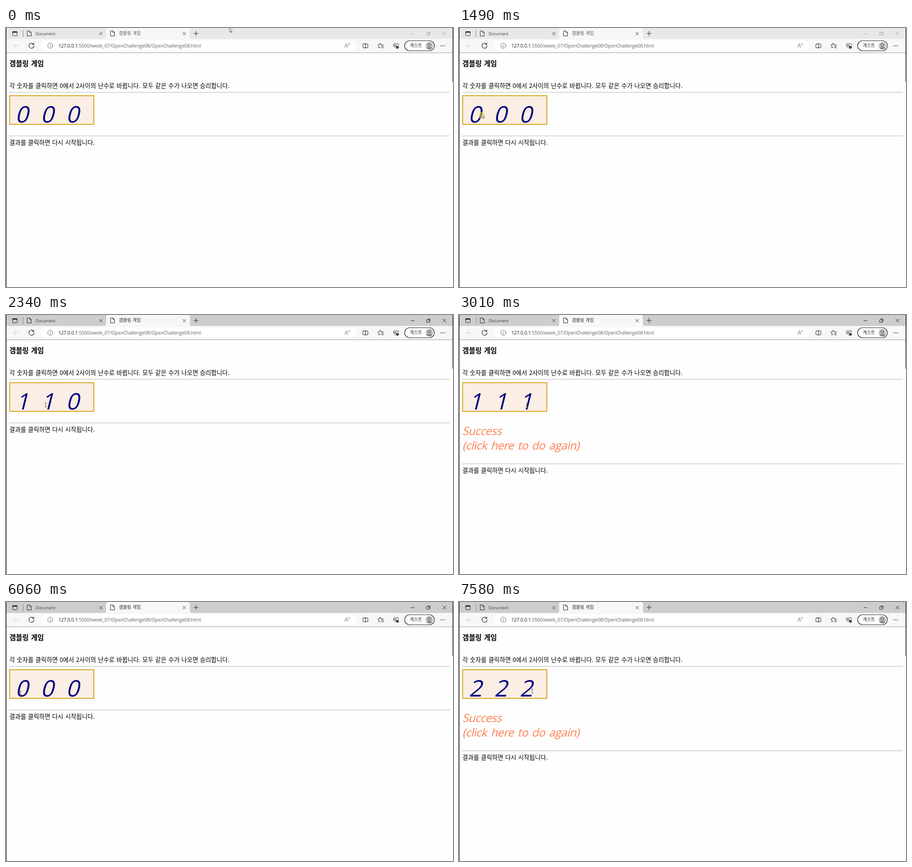
Recreate the animation shown at these times as an HTML page. Size 982 by 570 pixels, loop 8000 ms.

```html
<!DOCTYPE html>
<html lang="ko">
<head>
<meta charset="utf-8">
<title>갬블링 게임</title>
<style>
  html, body { margin: 0; width: 100%; height: 100%; overflow: hidden; background: #fefefe; }
  svg { display: block; width: 982px; height: 570px; }
  text { white-space: pre; }
  .ui { font-family: "Open Sans", "Noto Sans", sans-serif; }
  .ko { font-family: "Noto Sans CJK KR", "Noto Sans CJK", "Noto Sans CJK JP", sans-serif; }
  .body { font-size: 13.3px; word-spacing: .4px; }
  .icon { fill: none; stroke: #222; stroke-width: 1; stroke-linecap: round; stroke-linejoin: round; }
  .digit { font-size: 50px; fill: navy; text-anchor: middle; }
  .result { font-size: 24.6px; letter-spacing: -.45px; word-spacing: 2.6px; fill: coral; }
  .rule { fill: #b4b4b4; }
  #beam { fill: none; stroke: #a8a8a8; stroke-width: .9; mix-blend-mode: difference; }
</style>
</head>
<body>
<svg viewBox="0 0 982 570">
  <defs>
    <path id="doc" d="M1 .5H6L9.5 4V11.5H1ZM6 .5V4H9.5"/>
    <path id="cross" d="M-3-3L3 3M3-3L-3 3"/>
  </defs>
  <rect width="982" height="570" fill="#fefefe"/>

  <!-- tab strip -->
  <rect id="strip" width="982" height="25"/>
  <path d="M216 24Q220 24 220 20V4Q220 0 224 0H400Q404 0 404 4V20Q404 24 408 24Z" fill="#f7f7f7"/>
  <rect x="37" y="5" width="1" height="15" fill="#888"/>
  <g class="icon">
    <rect x="14.5" y="8" width="10" height="9" rx="1.5"/>
    <path d="M15 9H24" stroke-width="2.4"/>
    <use href="#doc" x="46" y="6"/>
    <use href="#doc" x="229" y="6"/>
    <use href="#cross" x="208.5" y="12.5"/>
    <use href="#cross" x="391.5" y="12.5"/>
    <path d="M412.5 12H422.5M417.5 7V17"/>
  </g>
  <g id="controls" class="icon">
    <path d="M889.5 12.5H896.5M959.5 8.5L967 16M967 8.5L959.5 16"/>
    <path d="M924.5 10.5H930V16H924.5ZM926.2 8.7H931.7V14.3"/>
  </g>
  <text class="ui" x="65" y="15.5" font-size="9.3" letter-spacing="-.27" fill="#444">Document</text>
  <text id="tabTitle" class="ko" x="248" y="15.4" font-size="9.8" word-spacing=".3">갬블링 게임</text>

  <!-- toolbar -->
  <rect y="24" width="982" height="30" fill="#f7f7f7"/>
  <rect y="54" width="982" height="1" fill="#a0a0a0"/>
  <rect x="77" y="27" width="692" height="24" rx="12" fill="#fff"/>
  <g class="icon">
    <path d="M28 39H16.5M21.5 34L16.5 39L21.5 44" stroke="#c8c8c8"/>
    <path d="M60.5 35.6A5.6 5.6 0 1 0 61.6 39M61 33.2V36.2H58" stroke-width="1.2"/>
    <circle cx="97.3" cy="39" r="5.6" stroke="#555" stroke-width=".9"/>
    <path d="M97.3 38.5V42M97.3 36.4V36.5" stroke="#555"/>
    <path d="M744 43L747.5 34L751 43M745.2 40H749.8M752 34Q753.2 35.5 752 37M754 33Q756 35.5 754 38" stroke="#777" stroke-width=".9"/>
    <rect x="784" y="35" width="11" height="8.5" rx="1.2"/>
    <path d="M789.5 34V44.5"/>
    <path d="M826 37.2L823.6 37L821.8 33.3L820.2 37L816.8 37.4L819.4 40.2L818.8 44L821.6 42.3M825 37.2H829.5M824.5 40.4H829.5M824.5 43.4H829.5"/>
    <path d="M856 44.3L852 40.2Q850.3 37.5 852 35.2Q854.5 33 857 35.8Q859.5 33 862 35.2Q863 36.5 862.7 38M851.5 39H854L855.3 37L857 41L858.2 39"/>
    <circle cx="860" cy="42.5" r="2.6" fill="#222"/>
    <path d="M858.8 42.5L859.7 43.4L861.3 41.6" stroke="#fff" stroke-width=".7"/>
    <rect x="875.7" y="28" width="65.3" height="22" rx="11" fill="#fff" stroke-width="1.2"/>
  </g>
  <circle cx="930" cy="39" r="8.6" fill="#cbc8c6"/>
  <path d="M924 44.8Q924 42 927 42H933Q936 42 936 44.8Q930 49.5 924 44.8Z" fill="#8b8886"/>
  <circle cx="930" cy="37" r="4.4" fill="#8b8886"/>
  <text class="ui" x="930" y="39.6" font-size="7" font-weight="700" fill="#fff" text-anchor="middle">?</text>
  <text class="ko" x="887" y="42.3" font-size="9.8" fill="#222">게스트</text>
  <g fill="#222"><circle cx="955.5" cy="39.3" r="1"/><circle cx="959.5" cy="39.3" r="1"/><circle cx="963.5" cy="39.3" r="1"/></g>
  <text class="ui" x="115" y="42.8" font-size="10.6" letter-spacing="-.245" fill="#666"><tspan fill="#222">127.0.0.1</tspan>:5500/week_07/OpenChallenge08/OpenChallenge08.html</text>

  <!-- page -->
  <text class="ko" x="7.5" y="84.3" font-size="15.4" font-weight="700" word-spacing=".6">갬블링 게임</text>
  <text class="ko body" x="7.5" y="131.7">각 숫자를 클릭하면 0에서 2사이의 난수로 바뀝니다. 모두 같은 수가 나오면 승리합니다.</text>
  <rect class="rule" x="7" y="141" width="968" height="1"/>
  <rect x="8" y="149" width="185" height="63" fill="#faeee5" stroke="goldenrod" stroke-width="2"/>
  <g id="digits" class="ui"></g>
  <g id="result" class="ui result">
    <text transform="translate(7.2 264) skewX(-14)">Success</text>
    <text transform="translate(7.6 296.3) skewX(-14)">(click here to do again)</text>
  </g>
  <g id="footer">
    <rect class="rule" x="7" y="237" width="968" height="1"/>
    <text class="ko body" x="7.5" y="257">결과를 클릭하면 다시 시작됩니다.</text>
  </g>
  <rect width="1" height="570"/>
  <rect x="981" width="1" height="118" fill="#0c0d1c"/>

  <!-- pointer -->
  <circle id="spot" cy="3" r="7" fill="#f4e52c" opacity=".6"/>
  <path id="arrow" d="M0 0V8.8L2 7L3.6 10.4L4.9 9.8L3.4 6.5H6.2Z" fill="#fff" stroke="#333" stroke-width=".75"/>
  <path id="beam" d="M-2-4.5H2M0-4.5V4.5M-2 4.5H2"/>
</svg>
<script>
  const LOOP = 8000, FOCUS = 1550, RESET = 5730, FLASH = 65;
  const $ = id => document.getElementById(id);

  // each column: [time, value]
  const rolls = [
    [[0, 0], [FOCUS, 1], [RESET, 0], [6450, 2]],
    [[0, 0], [2270, 1], [RESET, 0], [7060, 2]],
    [[0, 0], [3010, 1], [RESET, 0], [7580, 2]]
  ];
  const clicks = [...new Set(rolls.flatMap(r => r.slice(1).map(s => s[0])))];
  const nudge = [0, 1.5, 1.5];

  const linear = p => p;
  const out = p => 1 - (1 - p) ** 2;
  const smooth = p => p * p * (3 - 2 * p);

  // pointer stops: time, x, y, easing towards the stop
  const path = [
    [0, 491, 0], [40, 491, 0], [870, 101, 185, smooth], [1400, 50, 189, out],
    [1549, 50, 189], [FOCUS, 52, 195], [1760, 52, 195], [2140, 87, 198, smooth],
    [2340, 87, 198], [2610, 124, 200, smooth], [2800, 149, 200, out],
    [4830, 149, 200], [4880, 95, 207], [5130, 45, 214, out], [5230, 45, 214],
    [5540, 60, 256, smooth], [5740, 60, 256], [6060, 32, 200.5, smooth],
    [6190, 32, 196.5], [6540, 32, 196.5], [6930, 92, 198, smooth],
    [7080, 92, 198], [7380, 154, 197, smooth], [7470, 161, 196, out], [LOOP, 161, 196]
  ];

  function pointAt(t) {
    const i = path.findIndex(s => s[0] > t);
    const [t0, x0, y0] = path[i - 1];
    const [t1, x1, y1, ease = linear] = path[i];
    const p = ease((t - t0) / (t1 - t0));
    return [x0 + (x1 - x0) * p, y0 + (y1 - y0) * p];
  }

  const digits = rolls.map(() => {
    const el = document.createElementNS("http://www.w3.org/2000/svg", "text");
    el.setAttribute("class", "digit");
    el.setAttribute("y", 18);
    return $("digits").appendChild(el);
  });

  const show = (id, on) => $(id).setAttribute("visibility", on ? "visible" : "hidden");

  function draw(t) {
    const focused = t >= FOCUS;
    $("strip").setAttribute("fill", focused ? "#cdcdcd" : "#e8e8e8");
    $("controls").style.stroke = focused ? "#222" : "#a3a3a3";
    $("tabTitle").setAttribute("fill", focused ? "#222" : "#555");

    const values = rolls.map(r => r.findLast(s => s[0] <= t)[1]);
    values.forEach((v, i) => {
      digits[i].textContent = v;
      digits[i].setAttribute("transform", `translate(${38.9 + 55.7 * i + nudge[v]} 190) skewX(-14)`);
    });
    const won = values[0] > 0 && values.every(v => v === values[0]);
    show("result", won);
    $("footer").setAttribute("transform", `translate(0 ${won ? 90 : 0})`);

    const at = `translate(${pointAt(t).join(" ")})`;
    for (const id of ["spot", "arrow", "beam"]) $(id).setAttribute("transform", at);
    show("spot", clicks.some(c => t >= c - FLASH && t < c));
    show("arrow", !focused);
    show("beam", focused);
  }

  const start = performance.now();
  function tick() {
    draw((performance.now() - start) % LOOP);
    requestAnimationFrame(tick);
  }
  tick();
</script>
</body>
</html>
```
